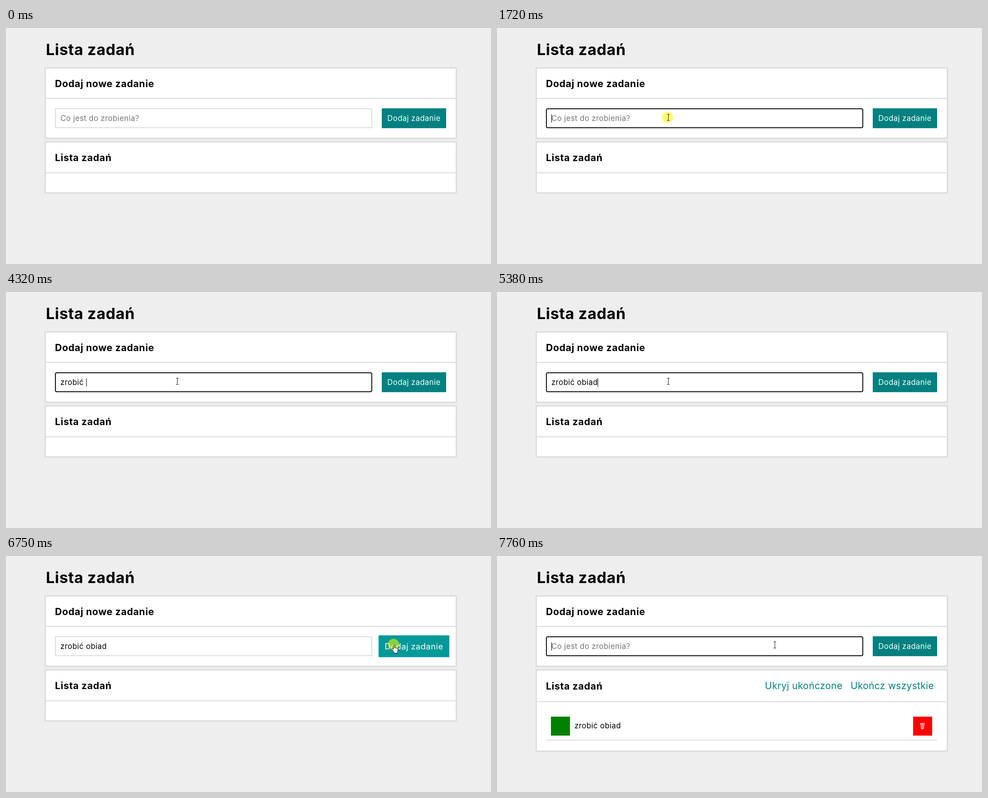
An HTML page that plays this animation: 1070x523 px, repeating every 8000 ms.

```html
<!DOCTYPE html>
<html lang="pl">
<head>
<meta charset="utf-8">
<title>Lista zadań</title>
<style>
html, body { margin: 0; width: 100%; height: 100%; overflow: hidden; background: #eee; }
#stage {
  position: relative; width: 1070px; height: 523px; overflow: hidden;
  font: 16.7px/30px Inter, "Open Sans", sans-serif; letter-spacing: .024em;
  font-optical-sizing: none; color: #000; white-space: pre;
}
#stage > *, .panel > *, #list > * { position: absolute; box-sizing: border-box; margin: 0; }
h1 { left: 88px; top: 28px; font-size: 34px; line-height: 40px; letter-spacing: .018em; }
h2 { left: 20px; top: 18px; font-size: 21.2px; line-height: 30px; letter-spacing: .03em; }
.panel { left: 85px; width: 910px; background: #fff; border: 3px solid #ddd; }
.panel hr { left: 0; width: 904px; height: 2px; border: 0; background: #ddd; }
#form { top: 87px; height: 159px; }
#form hr { top: 65px; }
#tasks { top: 251px; height: 116px; }
#tasks hr { top: 66px; }
.added #tasks { height: 183px; }
.added #tasks h2 { top: 19px; }
.added #tasks hr { top: 68px; }

#field {
  left: 108px; top: 178px; width: 700px; height: 44px; padding-left: 10px;
  display: flex; align-items: center; border: 2px solid #ddd; background: #fff;
}
#field.focus { border-color: #111; border-radius: 4px; }
#caret { width: 1px; height: 19px; margin: 1px -1px 0 0; background: #000; }
#hint { color: #757575; }
#button {
  left: 829px; top: 178px; width: 142px; height: 44px;
  line-height: 44px; text-align: center; color: #fff;
}

#list { display: none; inset: 0; }
.added #list { display: block; }
.link { top: 273px; font-size: 20.8px; color: #008080; }
.box { top: 356px; width: 42px; height: 42px; }
.task { left: 171px; top: 361px; }
.rule { left: 108px; top: 407px; width: 863px; height: 2px; background: #ddd; }
#pointer { left: 0; top: 0; }
</style>
</head>
<body>
<div id="stage">
  <h1>Lista zadań</h1>
  <div class="panel" id="form"><h2>Dodaj nowe zadanie</h2><hr></div>
  <div class="panel" id="tasks"><h2>Lista zadań</h2><hr></div>
  <div id="field"><span id="typed"></span><i id="caret"></i><span id="hint">Co jest do zrobienia?</span></div>
  <div id="button">Dodaj zadanie</div>
  <div id="list">
    <span class="link" style="left:591px">Ukryj ukończone</span>
    <span class="link" style="left:780px">Ukończ wszystkie</span>
    <div class="box" style="left:119px;background:#008000"></div>
    <span class="task">zrobić obiad</span>
    <svg class="box" style="left:918px;background:#f00" viewBox="0 0 42 42" fill="none" stroke="#fff">
      <path d="M16 14.5h9v2h-9zM17 16.5l1 10.5h5l1-10.5M19.4 17l.4 10M21.6 17l-.4 10"/>
    </svg>
    <div class="rule"></div>
  </div>
  <svg id="pointer" width="1070" height="523">
    <circle id="click" r="12.5" fill="#ff0" fill-opacity=".54"/>
    <g id="cursor" stroke-linejoin="round">
      <path id="arrow" d="M0 0V16l3.7-3.4 2.5 5.8 2.6-1.1-2.5-5.7h5.1z" fill="#fff" stroke="#000"/>
      <path id="beam" d="M-3-7h2.3l.7.7.7-.7H3M0-6.3V6.3M-3 7h2.3l.7-.7.7.7H3" fill="none" stroke="#222" stroke-width="1.1"/>
      <path id="hand" d="M-2-5.5c0-2 2.6-2 2.6 0V0c.5-1.1 2.3-.9 2.4.2 .6-.9 2.2-.6 2.3.5 .8-.7 2.2-.2 2.2 1V6c0 2-1.5 3-1.5 5.5H-.5C-.7 8.500-5 5.300-5.500 2.600-5.700 1-3.600.900-2 3z" fill="#fff" stroke="#000"/>
    </g>
  </svg>
</div>
<script>
const LOOP = 8000, ADD = 6810, BLUR = 6750;
const TEXT = 'zrobić obiad';
const keys = [2530, 2660, 2990, 3260, 3390, 3920, 4320, 4580, 4840, 4970, 5170, 5380];
const focusTimes = [[1720, BLUR], [7630, LOOP]];
const clicks = [[1720, 1790], [BLUR, ADD], [7630, 7760]];
// time, x, y
const path = [
  [110, 980, 508], [240, 850, 400], [380, 685, 296], [500, 540, 205], [590, 445, 166],
  [720, 378, 198], [6050, 378, 198], [6180, 470, 197], [6310, 670, 199], [6420, 822, 203],
  [6540, 851, 205], [6650, 857, 204], [6810, 857, 204], [6880, 846, 203], [6950, 785, 200],
  [7020, 663, 197], [7090, 632, 197], [7160, 620, 197], [7300, 613, 197]
];

const $ = id => document.getElementById(id);
const clamp = v => Math.min(1, Math.max(0, v));
const within = (t, spans) => spans.some(([a, b]) => t >= a && t < b);
const show = (id, on) => { $(id).style.display = on ? '' : 'none'; };
const inside = (x, y, l, t, r, b) => x >= l && x <= r && y >= t && y <= b;

// CSS "ease": cubic-bezier(.25, .1, .25, 1)
function ease(p) {
  const curve = (s, a, b) => 3 * s * (1 - s) * ((1 - s) * a + s * b) + s ** 3;
  let lo = 0, hi = 1;
  for (let i = 0; i < 20; i++) {
    const mid = (lo + hi) / 2;
    if (curve(mid, .25, .25) < p) lo = mid; else hi = mid;
  }
  return curve(lo, .1, 1);
}

function position(t) {
  const i = path.findIndex(k => k[0] > t);
  if (i < 0) return path[path.length - 1].slice(1);
  const [t0, x0, y0] = path[Math.max(0, i - 1)], [t1, x1, y1] = path[i];
  const p = clamp((t - t0) / (t1 - t0 || 1));
  return [x0 + (x1 - x0) * p, y0 + (y1 - y0) * p];
}

function drawField(t) {
  const text = t < ADD ? TEXT.slice(0, keys.filter(k => k <= t).length) : '';
  const focus = within(t, focusTimes);
  $('typed').textContent = text;
  $('field').classList.toggle('focus', focus);
  show('hint', !text);
  $('caret').style.visibility = focus && !(t >= 2260 && t < keys[0]) ? 'visible' : 'hidden';
}

function drawButton(t) {
  const hover = ease(clamp((t - 6420) / 300)) - ease(clamp((t - 6970) / 300));
  const tone = 128 + 25 * hover;
  $('button').style.background = `rgb(0 ${tone} ${tone})`;
  $('button').style.transform = `scale(${1 + .1 * hover})`;
}

function drawPointer(t) {
  const [x, y] = position(t);
  const beam = inside(x, y, 108, 178, 808, 222);
  const hand = inside(x, y, 822, 176, 978, 224);
  show('pointer', t >= path[0][0]);
  show('beam', beam);
  show('hand', hand);
  show('arrow', !beam && !hand);
  $('cursor').setAttribute('transform', `translate(${x} ${y})`);
  show('click', within(t, clicks));
  $('click').setAttribute('cx', x - 2);
  $('click').setAttribute('cy', hand ? y - 8 : y);
}

function render(t) {
  $('stage').classList.toggle('added', t >= ADD);
  drawField(t);
  drawButton(t);
  drawPointer(t);
}

const start = performance.now();
function tick(now) {
  render(Math.max(0, now - start) % LOOP);
  requestAnimationFrame(tick);
}
render(0);
requestAnimationFrame(tick);
</script>
</body>
</html>
```
